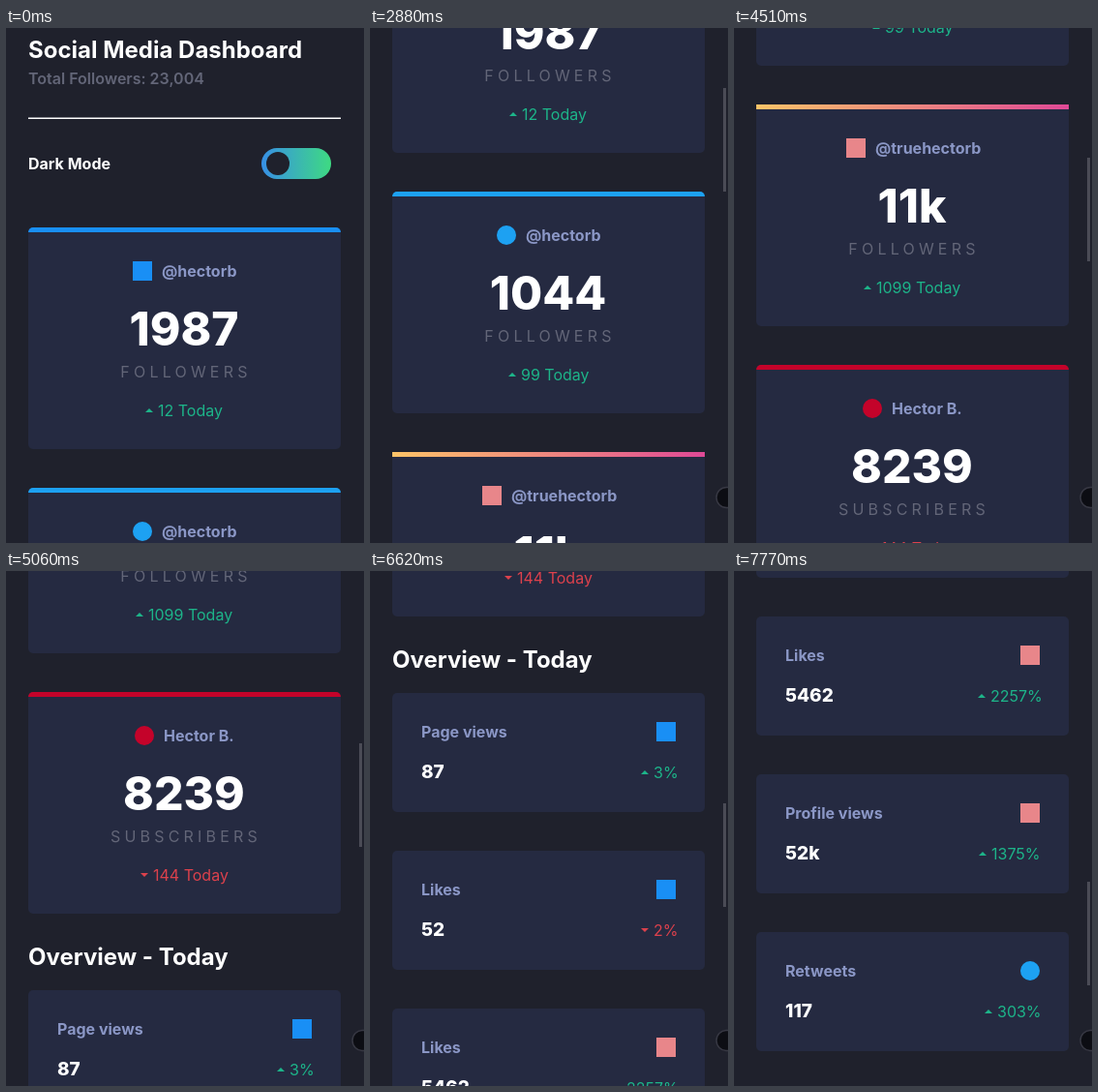
Recreate the animation shown at these times as an HTML page. Size 370 by 532 pixels, loop 8 s.

```html
<!DOCTYPE html>
<html lang="en">
<head>
<meta charset="utf-8">
<title>Social Media Dashboard</title>
<style>
  html, body { margin: 0; width: 100%; height: 100%; overflow: hidden; background: #1f212c; }
  svg { display: block; width: 370px; height: 532px; font: 400 16px Inter, sans-serif; fill: #fff; }
  .title { font-size: 24px; font-weight: 700; }
  .bold { font-weight: 700; }
  .name { font-weight: 700; fill: #8b97c6; }
  .dim { font-weight: 600; fill: #636678; }
  .big { font-size: 48px; font-weight: 800; text-anchor: middle; }
  .label { letter-spacing: 4.2px; fill: #636678; text-anchor: middle; }
  .value { font-size: 19px; font-weight: 800; }
  .up { fill: #1db489; }
  .down { fill: #dc414c; }
</style>
</head>
<body>
<svg viewBox="0 0 370 532">
  <defs>
    <linearGradient id="toggle"><stop stop-color="#378fe6"/><stop offset="1" stop-color="#3eda82"/></linearGradient>
    <linearGradient id="sunset"><stop stop-color="#fdc468"/><stop offset="1" stop-color="#df4996"/></linearGradient>
  </defs>
  <g id="page">
    <text class="title" x="23" y="31">Social Media Dashboard</text>
    <text class="dim" x="23" y="58">Total Followers: 23,004</text>
    <rect x="23" y="92.5" width="323" height="1.5"/>
    <text class="bold" x="23" y="146">Dark Mode</text>
    <rect x="264" y="124" width="72" height="32" rx="16" fill="url(#toggle)"/>
    <circle cx="281" cy="140" r="12" fill="#1f212c"/>
    <text class="title" x="23" y="1295">Overview - Today</text>
  </g>
  <rect id="thumb" x="365" width="3" height="107" fill="#4b4c56"/>
  <circle id="pointer" r="10.5" fill="#0c0d13" stroke="#373843" stroke-width="1.5"/>
</svg>
<script>
const byId = id => document.getElementById(id);
const page = byId('page'), thumb = byId('thumb'), pointer = byId('pointer');

const text = (cls, x, y, s) => `<text class="${cls}" x="${x}" y="${y}">${s}</text>`;

const panel = height => `<rect x="23" width="323" height="${height}" rx="5" fill="#252a41"/>`;

const change = (dir, x, y, s) =>
  `<path class="${dir}" d="M${x} ${dir === 'up' ? y - 4 : y - 8}h8l-4 ${dir === 'up' ? -4 : 4}z"/>` +
  text(dir, x + 13, y, s);

const icon = (site, x, y) => site.round
  ? `<circle cx="${x + 10}" cy="${y + 10}" r="10" fill="${site.color}"/>`
  : `<rect x="${x}" y="${y}" width="20" height="20" fill="${site.color}"/>`;

const blue = { color: '#198ff5' };
const sky = { color: '#1da1f2', round: true };
const coral = { color: '#e8868a', bar: 'url(#sunset)' };
const red = { color: '#c4032a', round: true };

// site, icon x, name, count, label, trend, arrow x, change
const accounts = [
  [blue, 131, '@hectorb', '1987', 'FOLLOWERS', 'up', 144, '12'],
  [sky, 131, '@hectorb', '1044', 'FOLLOWERS', 'up', 143, '99'],
  [coral, 116, '@truehectorb', '11k', 'FOLLOWERS', 'up', 134, '1099'],
  [red, 133, 'Hector B.', '8239', 'SUBSCRIBERS', 'down', 139, '144']
];

// site, label, value, trend, arrow x, change
const stats = [
  [blue, 'Page views', '87', 'up', 280, '3%'],
  [blue, 'Likes', '52', 'down', 280, '2%'],
  [coral, 'Likes', '5462', 'up', 252, '2257%'],
  [coral, 'Profile views', '52k', 'up', 253, '1375%'],
  [sky, 'Retweets', '117', 'up', 259, '303%']
];

const accountCard = ([site, x, name, count, label, trend, ax, amount], i) => {
  // Only plain coloured bars have rounded corners
  const top = site.bar ? 'M23 5V0H346V5z' : 'M23 5a5 5 0 0 1 5 -5H341a5 5 0 0 1 5 5z';
  return `<g transform="translate(0 ${206 + 269 * i})">${panel(229)}
    <path d="${top}" fill="${site.bar || site.color}"/>
    ${icon(site, x, 35)}${text('name', x + 30, 51, name)}
    ${text('big', 184, 122, count)}${text('label', 186, 155, label)}
    ${change(trend, ax, 195, amount + ' Today')}</g>`;
};

const statCard = ([site, label, value, trend, ax, amount], i) =>
  `<g transform="translate(0 ${1321 + 163 * i})">${panel(123)}
    ${text('name', 53, 46, label)}${icon(site, 296, 30)}
    ${text('value', 53, 88, value)}${change(trend, ax, 88, amount)}</g>`;

page.insertAdjacentHTML('beforeend', accounts.map(accountCard).join('') + stats.map(statCard).join(''));

// Each wheel turn advances the page in 70 ms steps
const quick = [23, 77, 100], soft = [6, 65, 95, 100], slow = [2, 10, 36, 80, 100];
const double = [23, 90, 150, 188, 200], spin = [23, 95, 170, 200];
const turns = [
  [1600, quick], [1940, quick], [2410, quick], [2880, soft], [3490, slow],
  [4030, soft], [4440, soft], [4850, double], [5460, quick], [5940, soft],
  [6480, soft], [6890, soft], [7290, spin], [7630, quick]
];

const scrollAt = t => turns.reduce((sum, [start, steps]) =>
  t < start ? sum : sum + steps[Math.min(steps.length - 1, Math.floor((t - start) / 70))], 0);

// time, x, y
const pointerPath = [
  [520, 361, 516], [590, 361, 501], [790, 364, 499], [860, 367, 497],
  [930, 368.5, 495.5], [1130, 368.5, 490], [1200, 368.5, 485]
];

function draw(now) {
  const t = now % 8000;
  const y = scrollAt(t);
  page.setAttribute('transform', `translate(0 ${-y})`);
  thumb.setAttribute('y', Math.round(y * 0.2 + 0.6));
  thumb.setAttribute('visibility', t < 1600 ? 'hidden' : 'visible');
  const spot = pointerPath.filter(p => p[0] <= t).pop();
  pointer.setAttribute('visibility', spot ? 'visible' : 'hidden');
  if (spot) pointer.setAttribute('transform', `translate(${spot[1]} ${spot[2]})`);
  requestAnimationFrame(draw);
}
draw(performance.now());
</script>
</body>
</html>
```
